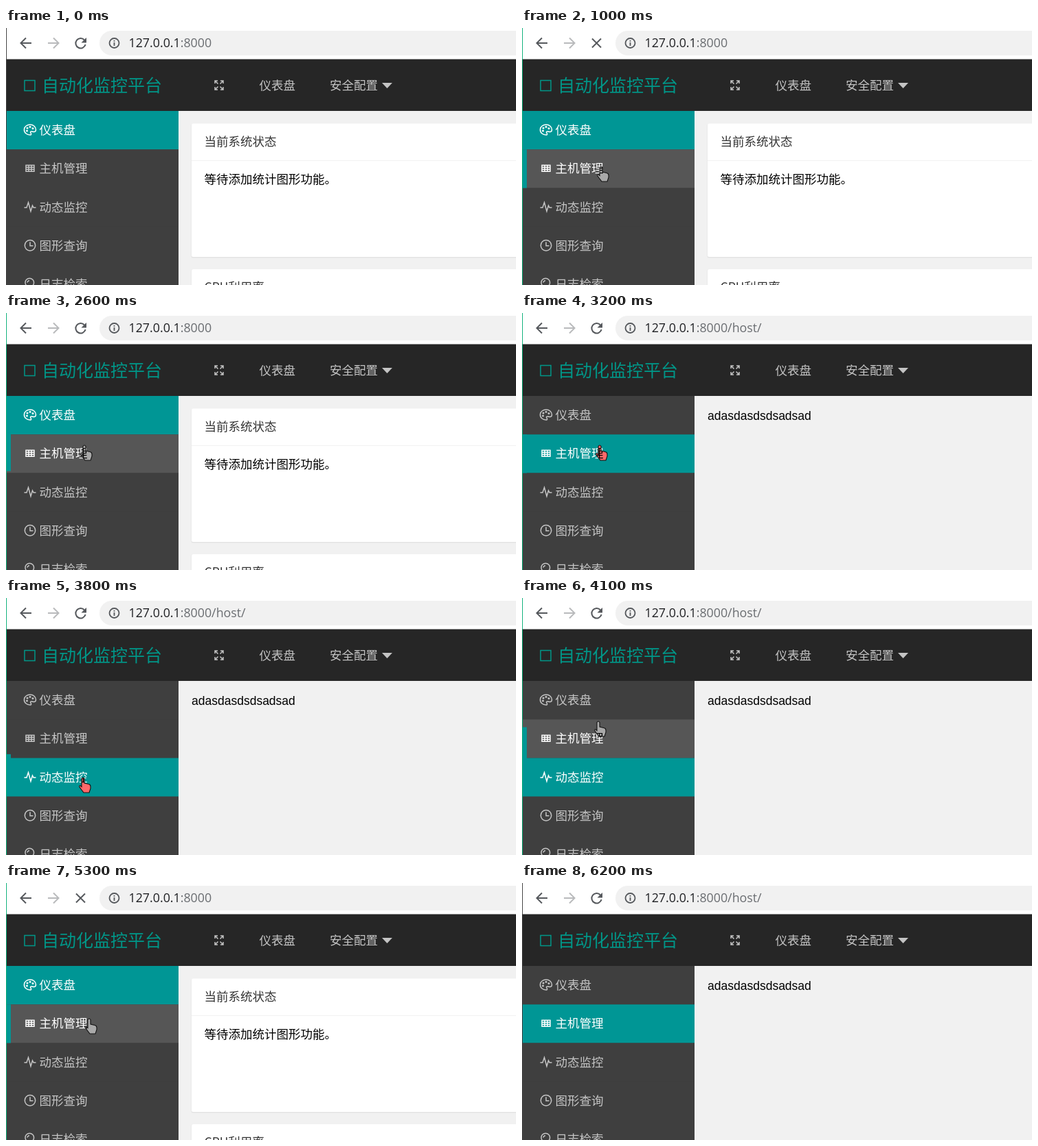
An HTML page for the animation above (6.3 s loop, 742 by 375 pixels).

```html
<!DOCTYPE html>
<html lang="zh-CN">
<head>
<meta charset="utf-8">
<style>
html, body { margin: 0; width: 100%; height: 100%; overflow: hidden; background: #f1f1f1; }
svg { display: block; }
text { font: 17.5px "Noto Sans CJK SC", "Noto Sans CJK", sans-serif; white-space: pre; }
.url { font: 17.8px "Open Sans", "Noto Sans", sans-serif; }
.latin { font: 17.5px "Liberation Sans", Arial, sans-serif; }
.title { font-size: 25px; }
.line { fill: none; stroke: currentColor; stroke-width: 1.5; }
.tool { fill: none; stroke: #55585c; stroke-width: 2; }
#fill { fill: #fff; mix-blend-mode: difference; }
#outline { fill: none; stroke: #111; stroke-width: 1.1; }
</style>
</head>
<body>
<svg width="742" height="375" viewBox="0 0 742 375">
  <rect width="742" height="375" fill="#f1f1f1"/>

  <!-- browser toolbar -->
  <rect width="742" height="46" fill="#fff"/>
  <rect x="136" y="4" width="640" height="36" rx="18" fill="#f1f1f1"/>
  <path class="tool" d="M37 22H22M29 14.5L21.5 22L29 29.5"/>
  <path class="tool" style="stroke:#b9babc" d="M61 22H76M69 14.5L76.5 22L69 29.5"/>
  <g id="reload">
    <path class="tool" d="M114 17.5A7.2 7.2 0 1 0 115.6 24"/>
    <path d="M117 14V21.5H109.5Z" fill="#55585c"/>
  </g>
  <path id="stop" class="tool" d="M102 15.5L115 28.5M115 15.5L102 28.5"/>
  <circle class="tool" style="stroke-width:1.8" cx="157.500" cy="22" r="7"/>
  <path class="tool" style="stroke-width:1.8" d="M157.500 21V26M157.500 18V19.800"/>
  <text class="url" x="178.500" y="28" fill="#202124">127.0.0.1<tspan id="path" fill="#6a6d71"></tspan></text>

  <!-- page header -->
  <rect y="45.500" width="742" height="75.500" fill="#262626"/>
  <rect x="27" y="76.500" width="15" height="15" fill="none" stroke="#009688" stroke-width="1.500"/>
  <text class="title" x="52" y="92.500" fill="#009688">自动化监控平台</text>
  <g color="#c4c4c4" fill="#c4c4c4">
    <path class="line" d="M304 81V77H308M304 77L308.500 81.500M312 77H316V81M316 77L311.500 81.500M304 86V90H308M304 90L308.500 85.500M312 90H316V86M316 90L311.500 85.500"/>
    <text x="368.500" y="90">仪表盘</text>
    <text x="471" y="90">安全配置</text>
    <path d="M547 80H562L554.500 88Z"/>
  </g>

  <!-- content -->
  <g id="dash">
    <g fill="#e3e3e3">
      <rect x="269.500" y="140" width="480" height="195.500" rx="2"/>
      <rect x="269.500" y="352" width="480" height="60" rx="2"/>
    </g>
    <g fill="#fff">
      <rect x="270" y="139.500" width="480" height="194.500" rx="2"/>
      <rect x="270" y="352" width="480" height="60" rx="2"/>
    </g>
    <path d="M270 193.500H742" stroke="#f2f2f2"/>
    <g fill="#333">
      <text x="288.500" y="171.500">当前系统状态</text>
      <text x="288.500" y="384">CPU利用率</text>
    </g>
    <text x="288.500" y="227">等待添加统计图形功能。</text>
  </g>
  <text id="host" class="latin" x="270" y="155.500">adasdasdsdsadsad</text>

  <!-- side menu -->
  <rect y="121" width="251" height="254" fill="#3f3f3f"/>
  <g id="menu"></g>
  <rect id="bar" x="1" width="6" height="56.250" fill="#009695"/>
  <rect id="edge" width="1" height="375"/>
  <path id="fill"/>
  <path id="outline"/>
</svg>
<script>
const LOOP = 6300, TOP = 121, ROW = 56.25, TEAL = '#009695';
const $ = id => document.getElementById(id);
const set = (el, attrs) => { for (const k in attrs) el.setAttribute(k, attrs[k]); };
const show = (id, on) => { $(id).style.display = on ? '' : 'none'; };

const HAND = 'M-2 1.5Q0-1.5 2 1.5V8L8 9.500Q11 10 11 13V16L9 22H1L-5 14Q-6 11-3.500 12L-2 13.500Z';
const ARROW = 'M0 0V17L4 13L7 20L10 19L7 12H12Z';

// Icons are centred on their own origin.
const dot = (x, y) => `<circle cx="${x}" cy="${y}" r="1.500" fill="currentColor"/>`;
const line = d => `<path class="line" d="${d}"/>`;
const items = [
  ['仪表盘', line('M1 7.500C-5 8-9 4-8.500-1C-8-5-4-7.500 0-7.500C5-7.500 8.500-4 8.500 0C8.500 3 6 3.500 3 2.500C0 2 0 4 1.500 5.500Q2 7 1 7.500Z')
    + dot(-4.500, 1.500) + dot(-4, -2.500) + dot(0, -4.300) + dot(4, -2)],
  ['主机管理', line('M-6-4.500H6V4.500H-6ZM-6-1.500H6M-6 1.500H6M-2-4.500V4.500M2-4.500V4.500')],
  ['动态监控', line('M-8.500 1H-5L-2.500-6.500L1 6.500L3.500-2L5 1H8.500')],
  ['图形查询', line('M-7.700 0A7.700 7.700 0 1 0 7.700 0A7.700 7.700 0 1 0-7.700 0M0-5V.500H4.500')],
  ['日志检索', line('M-7-2A6.300 6.300 0 1 0 5.600-2A6.300 6.300 0 1 0-7-2M-4-2A3.500 3.500 0 0 1-1-5M3 3L7 8')]
];
$('menu').innerHTML = items.map(([label, icon], i) => {
  const y = TOP + ROW * i;
  return `<g><rect y="${y}" width="251" height="${ROW}"/>
    <g transform="translate(35 ${y + 27.5})">${icon}</g>
    <text x="48.500" y="${y + 34}" fill="currentColor">${label}</text></g>`;
}).join('');
const rows = [...$('menu').children];

// Pointer path: time, x, y
const track = [
  [200, 474, 150], [300, 330, 172], [400, 190, 205], [500, 130, 214], [700, 116, 206],
  [1000, 115, 202], [1500, 113, 197], [1700, 113, 196], [2000, 112, 160], [2300, 112, 160],
  [2400, 112, 176], [2500, 114, 190], [2600, 114, 193], [3200, 113, 193], [3400, 112, 150],
  [3700, 112, 262], [3800, 112, 262], [3900, 112, 250], [4000, 111, 205], [4100, 111, 180],
  [4400, 112, 148], [4700, 112, 150], [5100, 121, 198], [5400, 121, 198],
  [5500, 300, 170], [5600, 660, 120]
];
function pointer(t) {
  const i = track.findIndex(k => k[0] > t);
  if (i < 1) return (i ? track[track.length - 1] : track[0]).slice(1);
  const [a, b] = [track[i - 1], track[i]], p = (t - a[0]) / (b[0] - a[0]);
  return [a[1] + (b[1] - a[1]) * p, a[2] + (b[2] - a[2]) * p];
}
const rowAt = y => Math.max(0, Math.min(4, Math.floor((y - TOP) / ROW)));

// The bar follows the hovered row with a 200 ms glide.
function barRow(t) {
  let sum = 0;
  for (let i = 0; i < 20; i++) sum += rowAt(pointer(t - 5 - i * 10)[1]);
  return sum / 20;
}

const switches = [1100, 2100, 2900, 4600, 5400];

function draw(t) {
  const onHost = switches.filter(s => t >= s).length % 2 === 1;
  const loading = switches.some(s => t >= s - 100 && t < s + 100);
  const active = onHost ? (t >= 3800 && t < 4600 ? 2 : 1) : 0;
  const visible = t >= 200 && t < 5700;
  const [x, y] = pointer(t);
  const inMenu = visible && x < 251 && y > TOP;
  const hovered = inMenu ? rowAt(y) : -1;

  show('dash', !onHost);
  show('host', onHost);
  show('stop', loading);
  show('reload', !loading);
  $('path').textContent = onHost ? ':8000/host/' : ':8000';

  rows.forEach((row, i) => {
    const lit = i === active || i === hovered;
    row.setAttribute('color', lit ? '#fff' : '#c5c5c5');
    row.firstChild.setAttribute('fill', i === active ? TEAL : i === hovered ? '#565656' : '#3f3f3f');
  });
  show('bar', inMenu);
  set($('bar'), { y: TOP + ROW * barRow(t) });
  set($('edge'), { fill: t >= 1000 && t < 6200 ? '#12b27c' : '#444' });

  for (const id of ['fill', 'outline']) {
    show(id, visible);
    set($(id), { d: inMenu ? HAND : ARROW, transform: `translate(${Math.round(x)} ${Math.round(y)})` });
  }
}

function tick() {
  draw(Math.floor(performance.now() % LOOP / 100) * 100);
  requestAnimationFrame(tick);
}
tick();
</script>
</body>
</html>
```
